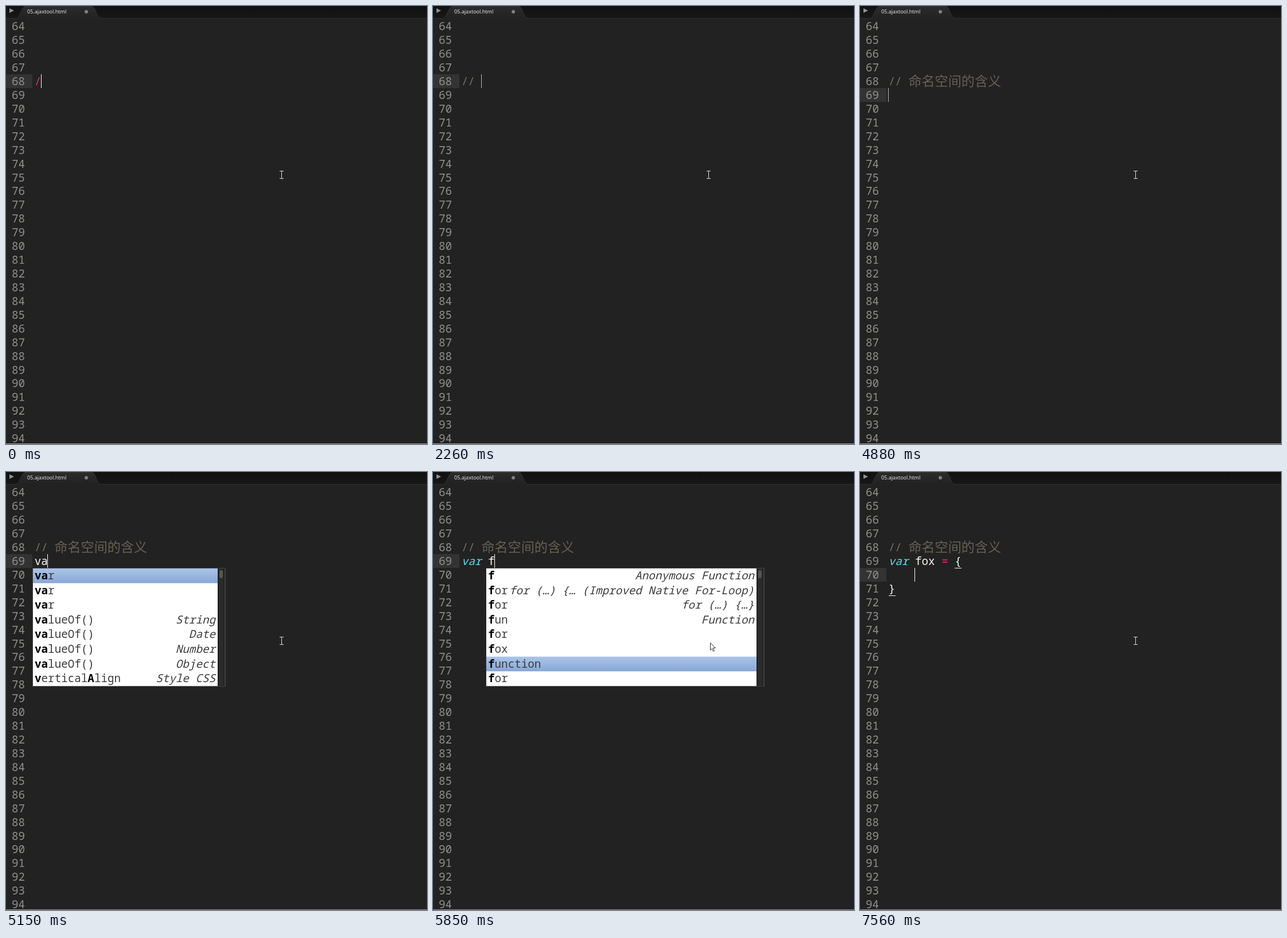
Animation of 734x763 px, one loop 7.99 s. Source, as an HTML page with a canvas:

```html
<!DOCTYPE html>
<html lang="zh-CN">
<head>
<meta charset="utf-8">
<style>
html, body { margin: 0; width: 100%; height: 100%; overflow: hidden; background: #222; }
canvas { display: block; }
</style>
</head>
<body>
<canvas width="734" height="763"></canvas>
<script>
const ctx = document.querySelector('canvas').getContext('2d');
const LOOP = 7990, LEFT = 49.8, CELL = 11.545, ROW = 23.93, ITEM = 25.6;
const FACE = '19.24px "Noto Sans Mono", monospace';
const MONO = '500 ' + FACE, ITALIC = 'italic 500 ' + FACE, BOLD = 'bold ' + FACE;
const CJK = '300 23.09px "Noto Sans CJK SC", "Noto Sans CJK", sans-serif';
const WHITE = '#f8f8f2', PINK = '#f92672', CYAN = '#66d9ef', COMMENT = '#75715e', COMMENT_CJK = '#646151';

const colX = col => LEFT + col * CELL;
const rowTop = line => Math.round(119 + (line - 68) * ROW);
const isWide = ch => ch > '\u2fff';
const columns = s => [...s].reduce((n, ch) => n + (isWide(ch) ? 2 : 1), 0);

// Popup entries: [name, detail, matched character indexes]
const vItems = n => [
  ['var'], ['var'], ['var'],
  ['valueOf()', 'String'], ['valueOf()', 'Date'], ['valueOf()', 'Number'], ['valueOf()', 'Object'],
  ['verticalAlign', 'Style CSS', n > 1 ? [0, 8] : [0]]
].map(([name, detail, hits]) => [name, detail, hits || [...Array(n).keys()]]);
const LOOPS = [['for', 'for (…) {… (Improved Native For-Loop)'], ['for', 'for (…) {…}']];
const fItems = [['f', 'Anonymous Function'], ...LOOPS, ['fun', 'Function'], ['for'], ['fox'], ['function'], ['for']]
  .map(([name, detail]) => [name, detail, [0]]);
const foItems = [...LOOPS, ['for'], ['fox'], ['function'], ['for']]
  .map(([name, detail]) => [name, detail, name === 'function' ? [0, 6] : [0, 1]]);

const vPopup = n => ({ x: 46, right: 383, items: vItems(n), selected: 0 });
const fPopup = (items, selected) => ({ x: 92, right: 578, items, selected });

// Editor states: [time, comment, code, caret opacity, popup]
const NOTE = '// 命名空间的含义', DIM = 0.7;
const states = [
  [0, '/', null, 1], [120, '//', null, 1], [270, '// ', null, 1],
  [550, '// ', null, DIM], [700, '// ', null, 0],
  [1220, '// ', null, DIM], [1340, '// ', null, 1],
  [1610, '// ', null, DIM], [1760, '// ', null, 0],
  [2260, '// ', null, DIM], [2410, '// ', null, 1],
  [2570, '// 命名空间', null, 1], [2960, '// 命名空间的', null, 1],
  [3390, '// 命名空间的', null, DIM], [3550, NOTE, null, 1],
  [3850, NOTE, '', 1], [4240, NOTE, '', DIM], [4360, NOTE, '', 0], [4880, NOTE, '', DIM],
  [5010, NOTE, 'v', 1, vPopup(1)], [5150, NOTE, 'va', 1, vPopup(2)],
  [5270, NOTE, 'var', 1], [5390, NOTE, 'var ', 1],
  [5850, NOTE, 'var f', 1, fPopup(fItems, 6)], [5970, NOTE, 'var fo', 1, fPopup(foItems, 0)],
  [6120, NOTE, 'var fox', 1], [6270, NOTE, 'var fox ', 1],
  [6490, NOTE, 'var fox =', 1], [6640, NOTE, 'var fox = ', 1],
  [7010, NOTE, 'var fox = ', DIM], [7150, NOTE, 'var fox = ', 0],
  [7300, NOTE, 'var fox = {}', 1], [7560, NOTE, 'var fox = {\n    \n}', 1]
];

function rect(x, y, w, h, fill) {
  ctx.fillStyle = fill;
  ctx.fillRect(x, y, w, h);
}

function text(s, x, y, fill, font = MONO, align = 'left') {
  ctx.font = font;
  ctx.fillStyle = fill;
  ctx.textAlign = align;
  ctx.fillText(s, x, y);
}

function shape(path, fill, stroke) {
  const p = new Path2D(path);
  if (fill) { ctx.fillStyle = fill; ctx.fill(p); }
  if (stroke) { ctx.strokeStyle = stroke; ctx.lineWidth = 1; ctx.stroke(p); }
}

function gradient(y0, y1, from, to) {
  const g = ctx.createLinearGradient(0, y0, 0, y1);
  g.addColorStop(0, from);
  g.addColorStop(1, to);
  return g;
}

function drawTabBar() {
  rect(0, 0, 734, 21, gradient(0, 21, '#111', '#171717'));
  rect(0, 21, 734, 1, '#303030');
  shape('M18 22C25 20 26 2 34 0H150C157 2 157 20 165 22Z', gradient(0, 22, '#2b2b2b', '#222'));
  shape('M18 21.5C25 20 26 2 34 .5H150C157 2 157 20 165 21.5', null, '#343434');
  shape('M6 4L14 8L6 12Z', '#929292');
  text('05.ajaxtool.html', 37, 13, '#e4e4e4', '9px "Noto Sans", sans-serif');
  shape('M137 10a3 3 0 1 0 6 0a3 3 0 1 0 -6 0', '#808080');
}

function drawGutter(current) {
  rect(0, rowTop(current), 46, 24, '#333');
  for (let n = 64; n <= 94; n++) text(n, 10, rowTop(n) + 19, '#8f908a');
}

function drawComment(s) {
  const base = rowTop(68) + 19;
  let col = 0;
  for (const ch of s) {
    if (isWide(ch)) text(ch, colX(col), base + 1, COMMENT_CJK, CJK);
    else text(ch, colX(col), base, s === '/' ? PINK : COMMENT);
    col += columns(ch);
  }
}

function drawCode(code) {
  code.split('\n').forEach((s, i) => {
    const top = rowTop(69 + i);
    [...s].forEach((ch, col) => {
      const keyword = s.startsWith('var') && col < 3;
      const fill = keyword ? CYAN : ch === '=' ? PINK : WHITE;
      text(ch, colX(col), top + 19, fill, keyword ? ITALIC : MONO);
      if ('{}'.includes(ch)) rect(Math.round(colX(col)), top + 24, 12, 1, WHITE);
    });
  });
}

function drawPopup({ x, right, items, selected }) {
  const top = 167, height = items.length * ITEM, listRight = right - 14;
  rect(x, top, right - x, height + 2, '#414141');
  rect(x + 1, top + 1, listRight - x - 1, height, '#fff');
  rect(listRight, top + 1, 12, height, '#222');
  rect(listRight + 2, top + 1, 8, height, '#2b2b2b');
  ctx.beginPath();
  ctx.roundRect(listRight + 3, top + 4, 6, 14, 3);
  ctx.fillStyle = '#555';
  ctx.fill();
  items.forEach(([name, detail, hits], i) => {
    const y = top + 1 + i * ITEM, base = Math.round(y + 19);
    if (i === selected) rect(x + 1, y, listRight - x - 1, ITEM, gradient(y, y + ITEM, '#abc5e9', '#88a7d6'));
    [...name].forEach((ch, k) => {
      const hit = hits.includes(k);
      text(ch, x + 4 + k * CELL, base, hit ? '#000' : '#3c3c3c', hit ? BOLD : MONO);
    });
    if (detail) text(detail, listRight - 4, base, '#3c3c3c', ITALIC, 'right');
  });
}

function drawPointer(overPopup) {
  if (overPopup) shape('M483.5 297.5V310.5L486.5 307.5L488.5 312.5L490.5 311.5L488.5 306.5H492.5Z', '#fff', '#333');
  else shape('M477 287.5H484M480.5 287.5V300M477 300.5H484', null, '#ddd');
}

function draw(time) {
  const [, comment, code, opacity, popup] = states.findLast(s => s[0] <= time);
  const lines = code === null ? [comment] : code.split('\n');
  const split = lines.length > 1;
  const caretLine = code === null ? 68 : split ? 70 : 69;
  const before = split ? lines[1] : lines[0].replace('}', '');

  rect(0, 0, 734, 763, '#222');
  drawTabBar();
  drawGutter(caretLine);
  drawComment(comment);
  if (code) drawCode(code);
  ctx.globalAlpha = opacity;
  rect(Math.floor(colX(columns(before))), rowTop(caretLine), 1, 24, '#f8f8f0');
  ctx.globalAlpha = 1;
  if (popup) drawPopup(popup);
  drawPointer(popup && popup.right > 480);
  rect(0, 762, 734, 1, '#999');
}

function tick() {
  draw(performance.now() % LOOP);
  requestAnimationFrame(tick);
}
tick();
</script>
</body>
</html>
```
